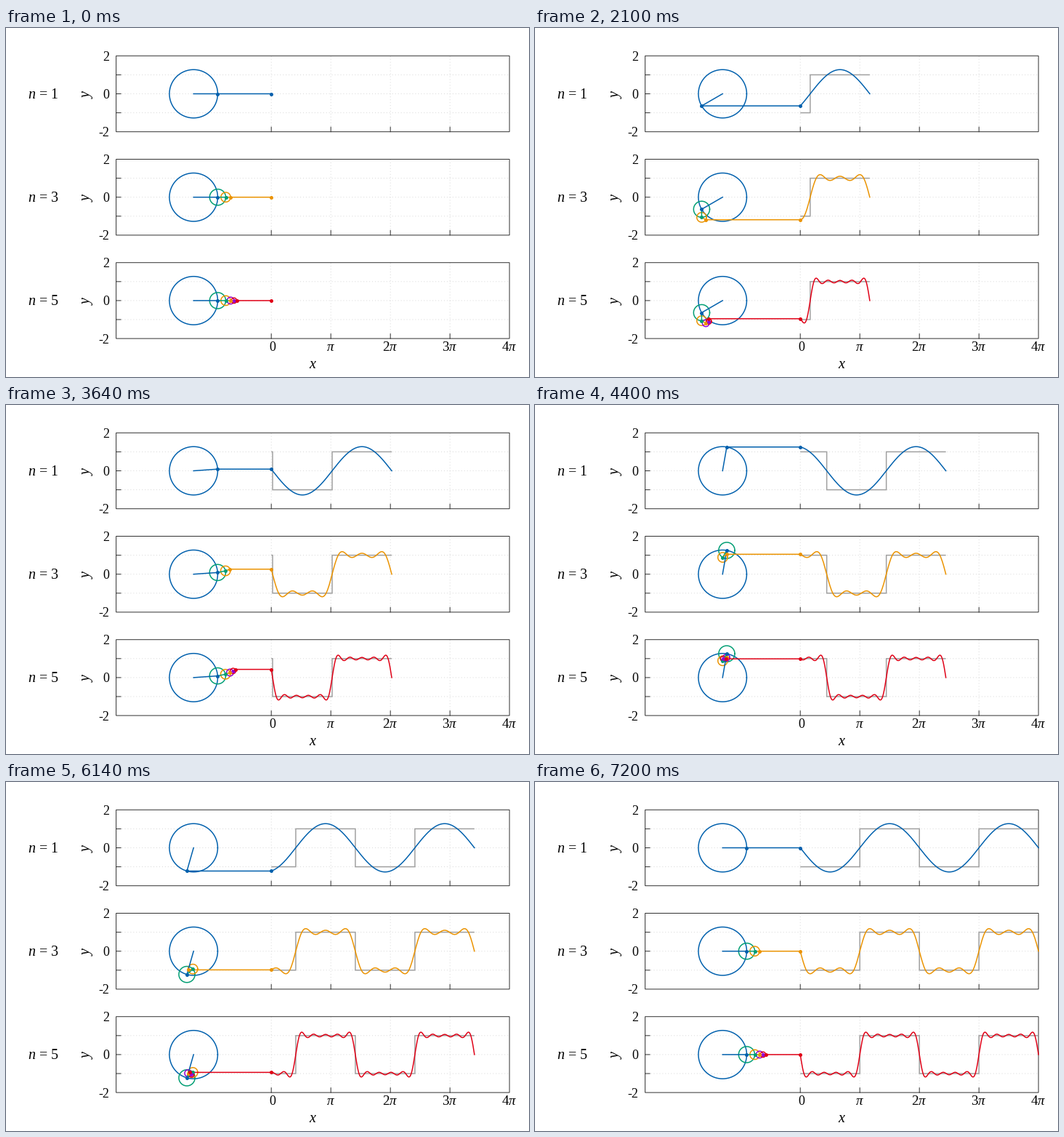
A matplotlib script that plays this animation: 720x480 px, repeating every 7.22 s.

```python
import numpy as np
import matplotlib.pyplot as plt
from matplotlib.animation import FuncAnimation
from matplotlib.patches import Rectangle

W, H, DPI = 720, 480, 100
PT = 72 / DPI                      # points per pixel
FRAMES, STEP = 361, np.radians(2)
UNIT = 26.1                        # pixels per data unit
X0, LEFT, RIGHT = 365.2, 151.6, 693.1
HUB = 258.2                        # x of the first circle's centre
ROW_Y = [90.5, 232.7, 374.9]
TERMS = [1, 3, 5]
COLORS = ["#0060ad", "#009e73", "#eb9300", "#9400d3", "#e00016"]

plt.rcParams.update({
    "font.family": "Liberation Serif",
    "mathtext.fontset": "custom",
    "mathtext.rm": "Liberation Serif",
    "mathtext.it": "Liberation Serif:italic",
    "path.snap": False,
})

fig = plt.figure(figsize=(W / DPI, H / DPI), dpi=DPI, facecolor="white")
ax = fig.add_axes([0, 0, 1, 1])
ax.set_xlim(0, W)
ax.set_ylim(H, 0)
ax.axis("off")

ring = np.linspace(0, 2 * np.pi, 121)


def line(xs=(), ys=(), color="black", width=1.5, z=3, **kw):
    return ax.plot(xs, ys, color=color, lw=width * PT, zorder=z, **kw)[0]


def dots(color):
    return line(color=color, width=0, z=6, ls="none", marker="o",
                ms=5 * PT, mew=0)


def label(x, y, text, size=18, ha="center", **kw):
    kw.setdefault("va", "baseline")
    ax.text(x, y, text, fontsize=size * PT, ha=ha, color="black", **kw)


def partial_sum(s, n):
    odd = 2 * np.arange(n)[:, None] + 1
    return (4 / np.pi * np.sin(odd * s) / odd).sum(axis=0)


def draw_frame(yc, n):
    half = 2 * UNIT
    ticks = [X0 + k * np.pi * UNIT for k in range(4)]
    dotted = dict(color="#d4d4d4", width=0.9, z=0, ls=(0, (1.1, 3.3)))
    for x in ticks:
        line([x, x], [yc + half, yc - half], **dotted)
        line([x, x], [yc + half, yc + half - 6.5], "#333333", 1, 1)
    for v in (-1, 0, 1):
        y = yc - v * UNIT
        line([LEFT, RIGHT], [y, y], **dotted)
        line([LEFT, LEFT + 6.5], [y, y], "#333333", 1, 1)
    ax.add_patch(Rectangle((LEFT, yc - half), RIGHT - LEFT, 2 * half,
                           fill=False, ec="#333333", lw=PT, zorder=1))
    for v in (-2, 0, 2):
        label(142.5, yc - v * UNIT + 6.5, str(v), ha="right")
    label(113, yc, "$y$", 20, rotation=90, va="center")
    label(29.5, yc + 6.5, f"$n$ = {n}", 20, ha="left")


class Panel:
    def __init__(self, yc, n):
        self.yc, self.n = yc, n
        draw_frame(yc, n)
        cols, last = COLORS[:n], COLORS[n - 1]
        self.square = line(color="#a0a0a0", z=2, solid_joinstyle="miter",
                           solid_capstyle="butt")
        self.wave = line(color=last, z=3)
        self.circles = [line(color=c, z=4) for c in cols]
        self.arms = [line(color=c, z=5) for c in cols]
        self.link = line(color=last, z=5)
        self.tips = [dots(c) for c in cols]
        self.end = dots(last)

    def update(self, t):
        x, y = HUB, self.yc
        for k in range(self.n):
            odd = 2 * k + 1
            r = 4 / np.pi / odd * UNIT
            self.circles[k].set_data(x + r * np.cos(ring), y + r * np.sin(ring))
            nx, ny = x + r * np.cos(odd * t), y - r * np.sin(odd * t)
            self.arms[k].set_data([x, nx], [y, ny])
            self.tips[k].set_data([nx], [ny])
            x, y = nx, ny
        self.link.set_data([x, X0], [y, y])
        self.end.set_data([X0], [y])

        s = np.linspace(0, t, int(t * UNIT) + 2)
        self.wave.set_data(X0 + UNIT * (t - s),
                           self.yc - UNIT * partial_sum(s, self.n))

        knots = np.append(np.arange(0, t - 1e-9, np.pi), t)
        levels = (-1.0) ** np.arange(len(knots) - 1)
        self.square.set_data(X0 + UNIT * (t - np.repeat(knots, 2)[1:-1]),
                             self.yc - UNIT * np.repeat(levels, 2))


panels = [Panel(yc, n) for yc, n in zip(ROW_Y, TERMS)]
label(367, 444, "0")
for k, text in enumerate([r"$\pi$", r"$2\pi$", r"$3\pi$", r"$4\pi$"], 1):
    label(X0 + k * np.pi * UNIT, 444, text, 19)
label(422, 468.5, "$x$", 20)


def update(i):
    for p in panels:
        p.update(i * STEP)
    return []


anim = FuncAnimation(fig, update, frames=FRAMES, interval=20,
                     repeat=True, repeat_delay=0)
plt.show()
```
